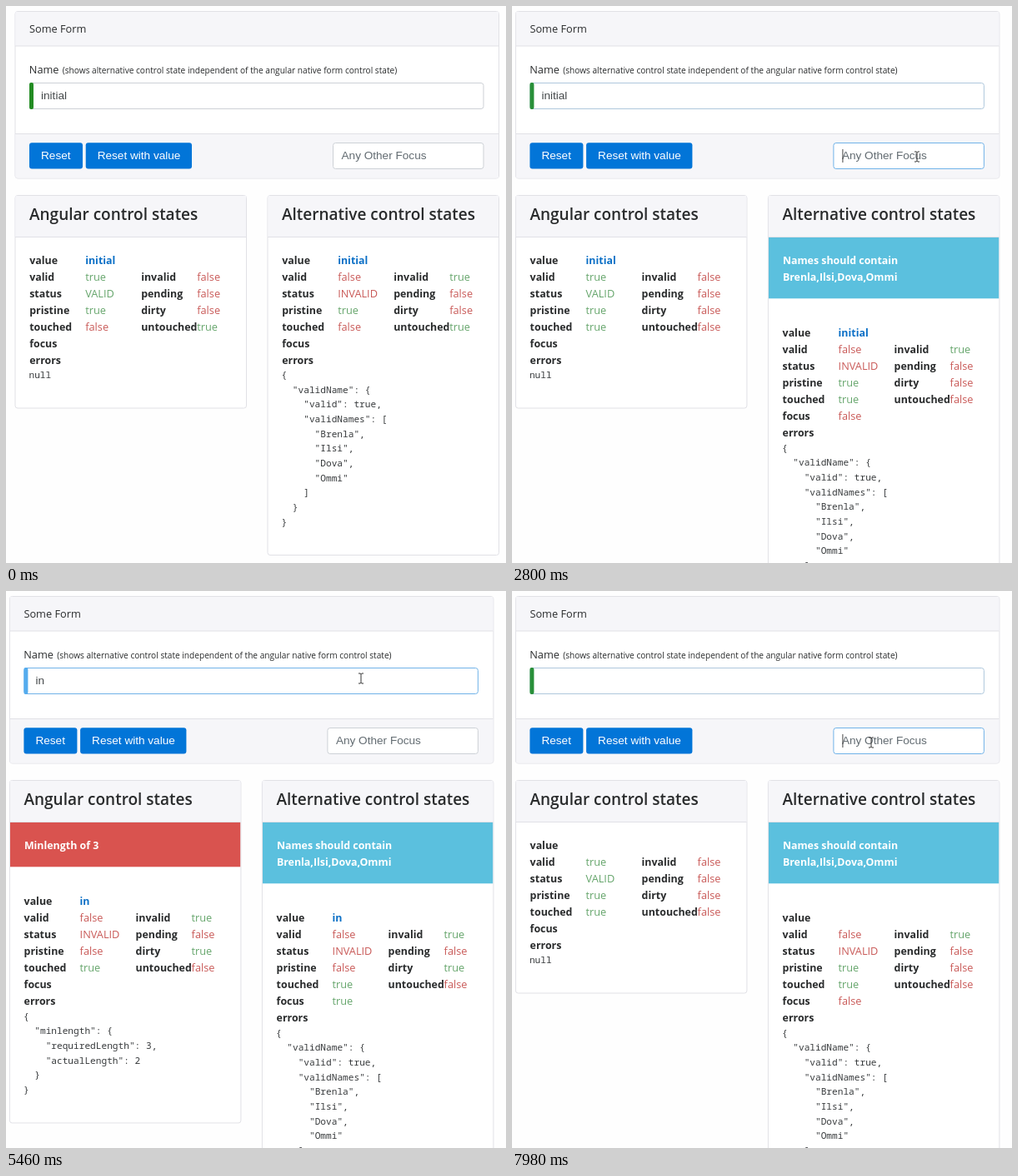
Write an HTML page that moves like this. It is 600 px wide and 669 px high and loops after 8000 ms.

```html
<!DOCTYPE html>
<html lang="en">
<head>
<meta charset="utf-8">
<title>Control states</title>
<style>
  html, body { margin: 0; width: 100%; height: 100%; overflow: hidden; background: #fefefe; }
  svg { display: block; width: 600px; height: 669px; }
  text { font: 12.75px "Open Sans", "Noto Sans", sans-serif; fill: #292b2c; white-space: pre; }
  .bold { font-weight: 700; font-size: 12.4px; }
  .title { font-weight: 600; font-size: 19px; }
  .small { font-size: 10.15px; }
  .mono { font: 11.15px "Noto Sans Mono", "DejaVu Sans Mono", monospace; fill: #373a3c; }
  .ctl { font: 13.6px "Liberation Sans", Arial, sans-serif; fill: #464a4c; }
  .hint { fill: #636c72; }
  .white { fill: #fff; }
  .value { fill: #0b6fc6; }
  .good { fill: #65a56b; }
  .bad { fill: #c95a58; }
</style>
</head>
<body>
<svg id="stage" viewBox="0 0 600 669"></svg>
<script>
const LOOP = 8000, STEP = 70;
const NAMES = ["Brenla", "Ilsi", "Dova", "Ommi"];
const BORDER = [205, 209, 214], BLUE = [112, 178, 232], BAR = [85, 172, 238], GREEN = [34, 139, 34];
const stage = document.getElementById("stage");

// Each list holds [start time, state]; the latest started entry counts.
const VALUES = [[0, "initial"], [3990, "initia"], [4130, "initi"], [4270, "init"], [4410, "ini"], [5040, "in"], [6370, ""]];
const FOCUS = [[0, ""], [1120, true], [2730, false], [3710, true], [6370, false], [7280, true], [7910, false]];
const TOUCHED = [[0, false], [2730, true], [6370, false], [7910, true]];
const PRISTINE = [[0, true], [3990, false], [6370, true]];
const OTHER = [[0, false], [2730, true], [3710, false], [7910, true]];
const CARET = [[0, true], [1400, false], [1890, true], [2450, false], [2730, true], [3290, false], [3710, true],
  [3850, false], [3990, true], [4690, false], [4900, true], [5460, false], [5950, true]];
const POINTER = [[630, 205, 166], [840, 116, 107], [1330, 116, 107], [1680, 440, 178], [1960, 440, 178],
  [2170, 486, 181], [3220, 486, 181], [3710, 426, 105], [5600, 426, 105], [5810, 400, 118], [6300, 64, 170],
  [6720, 64, 170], [7210, 150, 108], [7420, 150, 108], [7700, 431, 182]];

const latest = (list, t) => list.findLast(e => e[0] <= t);
const at = (list, t) => latest(list, t)[1];
const mix = (a, b, k) => `rgb(${a.map((v, i) => Math.round(v + (b[i] - v) * k))})`;

// Strength of a focus highlight: quick to appear, slower to fade.
function glow(list, t) {
  const [start, on] = latest(list, t);
  const k = Math.min(1, (t - start + STEP) / (on ? 140 : 210));
  return on ? k : start ? 1 - k : 0;
}

const text = (x, y, s, cls = "") => `<text x="${x}" y="${y}" class="${cls}">${s}</text>`;
const rect = (x, y, w, h, fill, more = "") =>
  `<rect x="${x}" y="${y}" width="${w}" height="${h}" fill="${fill}" ${more}/>`;
const box = (x, y, w, h, fill, stroke) => rect(x, y, w, h, fill, `rx="3" stroke="${stroke}"`);
const line = (x, y, w) => rect(x, y, w, 1, "#e1e1e6");
const card = (x, y, w, h) => box(x, y, w, h, "#fff", "#e1e1e6");
const caret = (x, y) => rect(x, y, 1, 16, "#444");

function button(x, w, label, dark) {
  return rect(x, 164.3, w, 31.3, dark ? "#025aa5" : "#0275d8", 'rx="3"') + text(x + 14, 184.3, label, "ctl white");
}

function pointer(t) {
  if (t < POINTER[0][0]) return "";
  const i = POINTER.findLastIndex(p => p[0] <= t);
  const a = POINTER[i], b = POINTER[i + 1] || a;
  const u = a === b ? 0 : (t - a[0]) / (b[0] - a[0]), k = u * u * (3 - 2 * u);
  const x = a[1] + (b[1] - a[1]) * k, y = a[2] + (b[2] - a[2]) * k;
  const beam = y > 92 && y < 124 || x > 385 && y > 164;
  return `<g transform="translate(${x} ${y})">` + (beam
    ? '<path d="M-3-6h2.2l.8.8.8-.8H3M0-5.5V5.5M-3 6h2.2l.8-.8.8.8H3" fill="none" stroke="#333"/>'
    : '<path d="M0 0V14l3.2-3 2.3 5.2 2.3-1-2.3-5H10Z" fill="#fff" stroke="#222" stroke-width=".9"/>') + "</g>";
}

function panel(x, title, s) {
  const shift = s.alert.length ? 20 * s.alert.length + 47.7 : 0;
  const rows = [["value", s.value], ["valid", s.valid, "invalid", !s.valid],
    ["status", s.valid ? "VALID" : "INVALID", "pending", false], ["pristine", s.pristine, "dirty", !s.pristine],
    ["touched", s.touched, "untouched", !s.touched], ["focus", s.focus], ["errors", ""]];
  const json = s.errors === null ? ["null"] : JSON.stringify(s.errors, null, 2).split("\n");
  let out = card(x, 227.5, 277.5, 255.5 + shift + 17.65 * (json.length - 1));
  out += rect(x + .5, 228, 276.5, 49, "#f6f6f9") + line(x, 277, 277) + text(x + 17, 257, title, "title");
  if (shift) {
    out += rect(x + .6, 278, 276.2, 20 * s.alert.length + 33.3, s.color);
    s.alert.forEach((row, i) => out += text(x + 17.5, 310 + 20 * i, row, "bold white"));
  }
  rows.forEach((row, r) => row.forEach((cell, c) => {
    const cls = c % 2 === 0 ? "bold" : r === 0 ? "bold value" : cell === true || cell === "VALID" ? "good" : "bad";
    out += text(x + 17.2 + 67 * c, 309.7 + shift + 20 * r, cell, cls);
  }));
  json.forEach((row, i) => out += text(x + 16.5, 447 + shift + 17.65 * i, row, "mono"));
  return out;
}

function draw(t) {
  const value = at(VALUES, t), focus = at(FOCUS, t), touched = at(TOUCHED, t), pristine = at(PRISTINE, t);
  const other = at(OTHER, t), blink = at(CARET, t), lit = glow(FOCUS, t);
  const short = value.length === 2;
  const left = { value, touched, pristine, focus: "", valid: !short, color: "#d9534f",
    alert: short ? ["Minlength of 3"] : [],
    errors: short ? { minlength: { requiredLength: 3, actualLength: 2 } } : null };
  const right = { value, touched, pristine, focus, valid: false, color: "#5bc0de",
    alert: touched ? ["Names should contain", NAMES.join()] : [],
    errors: { validName: { valid: true, validNames: NAMES } } };
  const pressed = t >= 6370 && t < 7280;

  stage.innerHTML = `<g transform="translate(${touched ? -6.6 : 0} 0)">` +
    card(11, 6.5, 580.5, 200.5) +
    rect(11.5, 7, 579.5, 41, "#f6f6f9") + line(11, 47.5, 580) + text(28, 32, "Some Form") +
    rect(11.5, 153.5, 579.5, 53, "#f6f6f9") + line(11, 153, 580) +
    text(27.8, 80.7, "Name") +
    text(67.8, 80.7, "(shows alternative control state independent of the angular native form control state)", "small") +
    box(28.5, 92.5, 544.5, 31, "#fff", mix(BORDER, BLUE, lit)) +
    rect(28, 92, 5, 32, mix(GREEN, BAR, lit * lit), 'rx="2"') +
    `<text id="field" x="42" y="112" class="ctl">${value}</text>` +
    (pressed ? rect(27, 163, 66, 34, "none", 'rx="4" stroke="#0275d8" stroke-opacity=".5" stroke-width="2"') : "") +
    button(28, 64, "Reset", t >= 6230 && t < 6860) + button(95.7, 127.3, "Reset with value") +
    box(392.5, 164.5, 180.5, 31, "#fff", mix(BORDER, BLUE, glow(OTHER, t))) +
    text(402.5, 184.3, "Any Other Focus", "ctl hint") + (other && blink ? caret(403, 172) : "") +
    panel(11, "Angular control states", left) + panel(314, "Alternative control states", right) +
    "</g>" + pointer(t);

  if (focus && blink) {
    const field = document.getElementById("field");
    field.insertAdjacentHTML("afterend", caret(42 + field.getComputedTextLength(), 99));
  }
}

let shown = -1;
function tick() {
  const t = Math.floor(performance.now() % LOOP / STEP) * STEP;
  if (t !== shown) draw(shown = t);
  requestAnimationFrame(tick);
}
tick();
</script>
</body>
</html>
```
